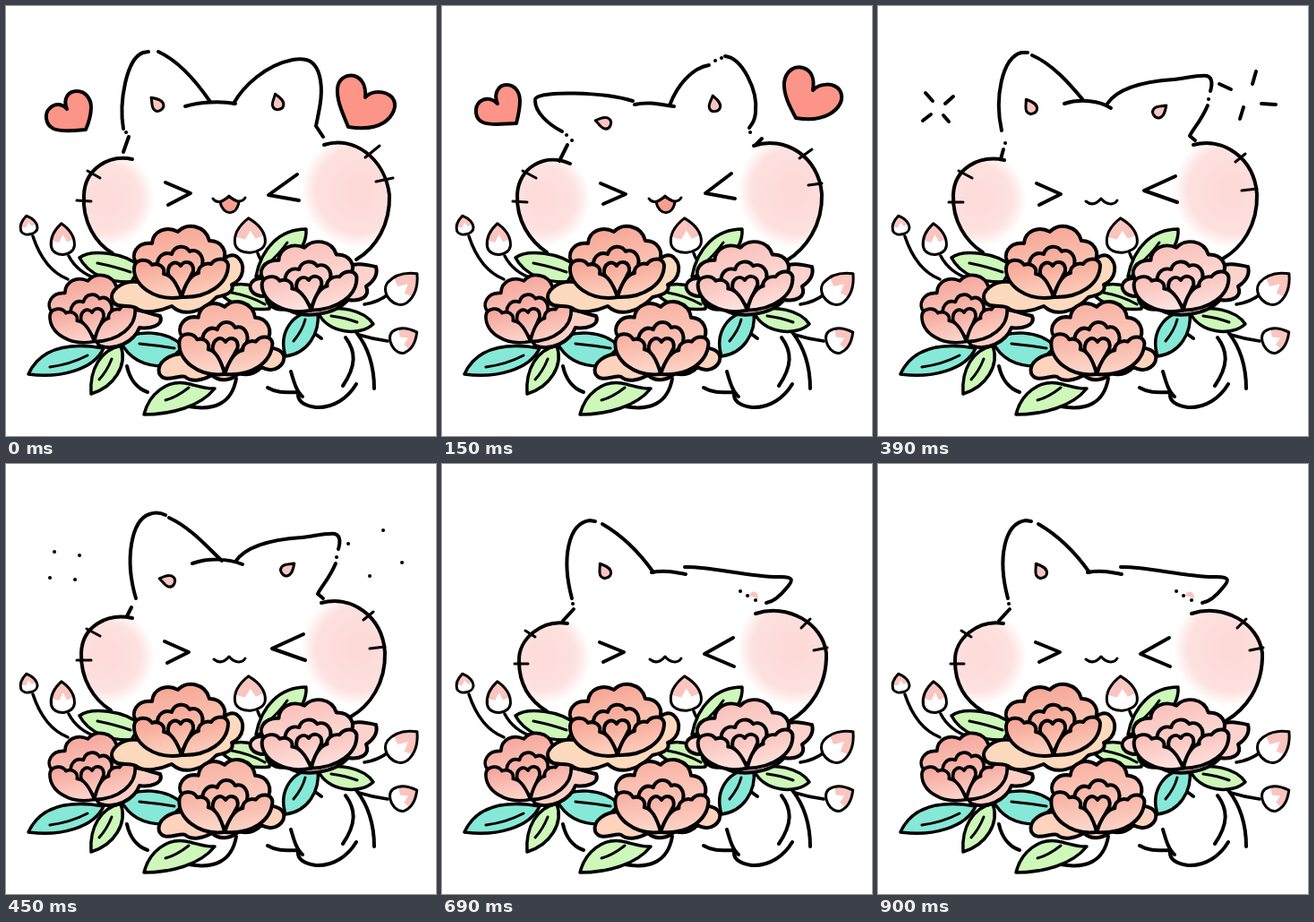
An HTML page for the animation above (1050 ms loop, 480 by 480 pixels).

```html
<!DOCTYPE html>
<html lang="en">
<head>
<meta charset="utf-8">
<title>Cat with peonies</title>
<style>
  html, body { margin: 0; width: 100%; height: 100%; overflow: hidden; background: #fff; }
  svg { display: block; width: 100%; height: 100%; }
  path { stroke-linecap: round; stroke-linejoin: round; }
</style>
</head>
<body>
<svg id="stage" viewBox="0 0 480 480">
  <defs>
    <radialGradient id="blushLeft" gradientUnits="userSpaceOnUse" cx="112" cy="215" r="54">
      <stop offset=".2" stop-color="#fddcda"/><stop offset=".7" stop-color="#fde2e0"/><stop offset="1" stop-color="#fff"/>
    </radialGradient>
    <radialGradient id="blushRight" gradientUnits="userSpaceOnUse" cx="394" cy="206" r="64">
      <stop offset=".2" stop-color="#fddad8"/><stop offset=".75" stop-color="#fde1df"/><stop offset="1" stop-color="#fff"/>
    </radialGradient>
  </defs>
  <g id="cat" fill="none" stroke="#000" stroke-width="4"></g>
  <g id="bouquet" fill="none" stroke="#000" stroke-width="4"></g>
</svg>
<script>
const STEP = 150;
const BLACK = '#000';

const path = (d, fill = 'none', stroke = BLACK, extra = '') =>
  `<path d="${d}" fill="${fill}" stroke="${stroke}" ${extra}/>`;
const thin = (d, fill) => path(d, fill, BLACK, 'stroke-width="3"');
const place = (x, y, turn, content, scale = 1) =>
  `<g transform="translate(${x} ${y}) rotate(${turn}) scale(${scale})">${content}</g>`;
const dots = points => points.map(([x, y]) => `M${x} ${y}h.1`).join('');

// ---------- bouquet ----------
const MINT = '#86e8d6', GREEN = '#cdf8ba';

const leaves = [
  [GREEN, 'M82 281C95 271 132 275 150 291L140 308C116 309 92 300 82 281Z', 'M102 287Q122 291 139 297'],
  [MINT, 'M25 411C36 387 62 374 109 382C98 406 60 416 25 411Z', 'M49 403Q72 400 91 390'],
  [GREEN, 'M95 433C93 405 106 384 128 379C136 401 121 425 95 433Z', 'M104 417Q113 407 118 394'],
  [MINT, 'M128 375C145 360 180 362 198 380L176 402C155 402 138 395 128 375Z', 'M149 377Q170 379 188 382'],
  [GREEN, 'M154 456C160 432 180 418 200 421C212 423 222 428 233 427C217 447 185 456 154 456Z', 'M178 440Q190 437 204 426'],
  [GREEN, 'M335 249C306 249 285 270 279 302C301 300 337 277 335 249Z', 'M288 292Q305 277 314 264'],
  [GREEN, 'M238 320C254 306 274 308 296 323L294 338C268 341 251 333 238 320Z', 'M252 320Q271 323 289 333'],
  [MINT, 'M312 391C304 365 319 340 348 341C351 366 336 388 312 391Z', 'M321 374Q331 362 334 350'],
  [GREEN, 'M348 342C370 332 400 340 410 355C395 369 360 366 348 342Z', 'M363 346Q379 348 392 353'],
];

// x, y, turn, horizontal and vertical scale
const buds = [
  [25, 245, -12, .72, .85],
  [63, 261, -4, 1, 1.4],
  [272, 257, -4, 1.3, 1.55],
  [443, 314, 46, 1.2, 1.7],
  [444, 372, 62, 1.05, 1.28],
];
const budShape = 'M0 -13C7 -9 14 -3 13 5C11 14 -11 14 -13 5C-14 -3 -7 -9 0 -13Z';
const budTip = 'M0 -13C7 -9 12 -5 12 0L5 2L1 -4L-4 2L-12 0C-12 -5 -7 -9 0 -13Z';

const stems = 'M30 257C37 278 49 297 69 305M70 279Q80 298 103 305M281 276Q284 285 291 291'
  + 'M428 321Q415 331 400 333M426 374Q410 372 394 367';
const body = 'M135 402C138 416 146 427 158 431M257 416C252 444 232 452 204 447'
  + 'M292 426C304 433 314 431 325 431M318 408C322 422 325 431 331 436M326 432C325 441 332 446 346 448C366 449 382 437 391 422'
  + 'M379 370C391 386 391 402 376 424M391 364C405 382 411 404 411 427M341 363L352 371';

const crown = 'M-50 -3C-58 -12 -50 -27 -33 -25C-32 -39 -17 -45 -4 -38C6 -49 27 -45 31 -28C45 -28 53 -15 45 -3L30 22L-30 22Z';
const middle = 'M-26 4C-30 -8 -21 -17 -11 -13C-8 -23 4 -24 9 -16C18 -20 27 -10 22 2L0 30Z';
const heart = 'M-15 9C-16 -3 -6 -7 -1 0C3 -7 14 -5 13 6L0 32Z';
const leftPetal = 'M0 35C-30 40 -54 22 -53 2C-52 -8 -38 -9 -33 -1C-25 -4 -18 2 -20 9C-11 10 -5 20 0 35Z';
const rightPetal = 'M0 35C30 36 52 20 52 -1C50 -10 38 -9 33 -2C25 -4 18 2 19 8C10 10 4 20 0 35Z';

const flowers = [
  { x: 97, y: 342, sx: .91, sy: .93, turn: -3, deep: '#f4a097', pale: '#fcd1c7', outer: '#fbcfc4',
    back: 'M134 321C146 314 151 328 145 339C157 341 165 345 172 346C177 357 159 361 149 359C143 375 121 386 104 379L88 355Z' },
  { x: 339, y: 306, sx: 1.01, sy: .96, turn: -3, deep: '#f9bbb5', pale: '#fde0dc', outer: '#fcd3cc',
    back: 'M378 291C391 286 403 289 413 291C416 302 408 309 402 313C407 325 395 330 382 328C367 345 331 350 314 338C301 341 289 333 291 324C273 325 268 312 277 306C283 302 296 305 303 309Z' },
  { x: 196, y: 290, sx: 1, sy: 1, turn: 0, deep: '#f5a090', pale: '#fccebc', outer: '#fdd9bd',
    back: 'M147 308C130 306 114 318 119 329C122 338 138 333 145 337C154 345 174 340 185 335C199 348 220 341 235 325C249 322 255 318 252 311C266 305 268 288 258 280C252 276 244 280 240 286Z' },
  { x: 246, y: 375, sx: .99, sy: 1.03, turn: 3, deep: '#f7ac9d', pale: '#fcd5c8', outer: '#fdd3bd',
    back: 'M199 388C182 388 168 398 171 410C176 422 194 411 200 414C208 421 221 417 230 412C239 421 253 417 260 410C274 414 282 407 285 403C300 412 313 399 310 390C307 382 298 383 290 379Z' },
];

function flower(f, i) {
  const petals = [crown, middle, heart, leftPetal, rightPetal].map(d => path(d, `url(#petal${i})`)).join('');
  return `<linearGradient id="petal${i}" x2=".25" y2="1">
      <stop stop-color="${f.deep}"/><stop offset="1" stop-color="${f.pale}"/></linearGradient>`
    + path(f.back, f.outer) + place(f.x, f.y, f.turn, petals, `${f.sx} ${f.sy}`);
}

const bud = path(budShape, '#fff', 'none') + path(budTip, '#fbc5bf', 'none')
  + path(budShape, 'none', BLACK, 'vector-effect="non-scaling-stroke" stroke-width="3"');

document.getElementById('bouquet').innerHTML =
  path(stems, 'none', BLACK, 'stroke-width="3.5"') + path(body)
  + buds.map(([x, y, turn, sx, sy]) => place(x, y, turn, bud, `${sx} ${sy}`)).join('')
  + leaves.map(([fill, shape, vein]) => path(shape, fill, BLACK, 'stroke-width="3.5"') + thin(vein)).join('')
  + flowers.map(flower).join('');

// ---------- cat ----------
const drop = 'M-1 -9C3 -5 8 0 6 5C4 10 -5 10 -6 4C-7 0 -3 -4 -1 -9Z';
const openMouth = 'M231 215C235 221 242 219 249 212C256 219 263 220 267 214';
const tongue = 'M239 219C242 234 257 235 260 219L249 213Z';
const closedMouth = 'M232 218C237 222 243 222 249 215C255 222 263 223 267 217';
const rightEarTilted = 'M256 109C268 91 300 84 330 82C346 80 358 77 367 78C374 80 373 88 371 95M369 104h.1M368 111C361 128 351 138 348 145L354 150';

// marks: ear insides as x, y, turn
const blink = {
  head: 'M145 150C133 105 141 66 165 63L171 64M179 67C205 82 224 104 236 121M234 121C249 118 261 121 272 123'
    + 'M271 115C300 114 345 127 378 126C393 126 392 130 385 138C377 148 369 154 362 155M146 156h.1M147 162L135 175'
    + dots([[333, 142], [341, 147], [350, 152]]),
  left: 'M140 178C112 173 85 195 86 220C86 248 99 265 117 276',
  right: 'M350 167C386 155 425 178 429 211C430 249 410 274 388 287',
  ticks: 'M93 186L104 193M81 223L96 223M401 183L411 173M415 208L430 205',
  eyes: 'M176 199L203 210L180 221M325 194L293 212L326 226',
  marks: [[181, 119, -25]],
  tint: 'M343 147C345 140 353 141 353 150Z',
};

const poses = [
  {
    head: 'M131 137C126 108 134 59 153 52L159 51M170 51C192 61 213 85 228 107M200 112C216 107 240 106 256 109'
      + 'M254 109C265 89 290 66 320 60C338 57 346 63 350 78C355 98 349 118 346 134L354 146M137 146L131 163M134 141h.1',
    left: 'M141 171C115 165 88 182 87 211C85 241 100 265 119 276',
    right: 'M355 155C388 144 423 170 428 211C429 244 413 270 391 283',
    ticks: 'M91 184L105 192M79 217L95 218M401 169L417 156M413 196L432 192',
    eyes: 'M178 197L206 209L181 222M325 188L293 211L327 217',
    marks: [[168, 109, -35], [303, 107, -10]],
    open: true,
    hearts: [
      'M89 138C78 139 62 141 53 137C43 132 43 119 49 114C55 108 63 109 68 115C63 103 70 95 79 95C89 95 95 104 95 113C95 122 92 131 89 138Z',
      'M382 135C376 120 369 106 370 92C371 81 380 76 389 78C398 81 402 90 401 102C408 94 423 94 431 102C438 111 432 123 422 130C411 137 395 137 382 135Z',
    ],
  },
  {
    head: 'M104 106C104 118 118 132 134 140M104 104C107 94 181 96 213 106M215 110C233 106 247 111 259 112'
      + 'M254 111C263 87 280 69 298 66M316 56C335 58 353 94 350 119C349 130 346 131 343 136M357 148L350 155M140 155L131 173'
      + dots([[139, 144], [145, 150], [305, 61], [312, 58], [344, 141]]),
    left: 'M143 176C114 163 85 181 84 211C83 240 98 262 117 275',
    right: 'M348 156C382 144 421 168 424 210C425 245 406 271 385 284',
    ticks: 'M90 184L105 192M79 218L95 219M399 170L413 160M409 200L424 198',
    eyes: 'M177 198L205 210L180 221M323 187L294 209L327 215',
    marks: [[180, 130, -70], [304, 109, -5]],
    open: true,
    hearts: [
      'M83 131C71 131 55 134 46 130C36 126 36 113 42 107C49 101 57 104 62 109C57 98 63 88 72 88C83 88 87 98 87 106C87 115 85 123 83 131Z',
      'M395 125C388 112 381 99 382 85C384 72 394 66 403 69C413 72 416 82 414 94C422 86 437 85 444 94C450 104 443 115 432 121C421 127 407 127 395 125Z',
    ],
  },
  {
    head: 'M138 139C130 103 138 58 160 52L167 52M172 55C195 65 214 87 229 105M208 109C226 103 248 106 260 114'
      + 'M142 153h.1M140 160L137 171' + rightEarTilted,
    left: 'M141 172C113 166 85 181 84 211C83 240 98 263 117 275',
    right: 'M352 155C386 146 420 170 423 210C424 245 406 270 385 282',
    ticks: 'M90 184L105 192M79 219L95 219M399 174L410 165M406 206L423 204',
    eyes: 'M177 198L204 210L180 222M332 190L297 206L334 219',
    marks: [[170, 112, -25], [315, 117, 55]],
    spark: 'M53 97L61 106M84 101L75 109M50 128L59 121M73 122L79 129'
      + 'M422 73L418 87M381 87L394 93M428 109L444 110M408 113L404 126',
  },
  {
    head: 'M145 150C132 106 140 63 160 56C168 53 174 55 178 57M182 60C206 71 225 93 241 108M208 111C226 105 247 105 264 112'
      + 'M140 160L135 170' + rightEarTilted,
    left: 'M141 172C113 166 85 181 84 211C83 240 98 263 117 275',
    right: 'M352 155C386 146 420 170 423 210C424 245 406 270 385 282',
    ticks: 'M90 184L105 192M79 219L95 219M399 174L410 165M406 206L423 204',
    eyes: 'M177 198L204 210L180 222M332 190L297 206L334 219',
    marks: [[180, 130, -70], [315, 117, 55]],
    spark: dots([[54, 98], [82, 102], [49, 127], [77, 129], [421, 74], [382, 89], [442, 110], [406, 125]]),
  },
  blink, blink, blink,
];

function drawCat(pose) {
  const mouth = pose.open ? thin(tongue, '#f79f90') + thin(openMouth) : thin(closedMouth);
  return path(pose.left + 'C145 278 170 250 166 210C164 190 154 178 140 171Z', 'url(#blushLeft)', 'none')
    + path(pose.right + 'C350 285 326 240 330 208C332 182 340 166 352 156Z', 'url(#blushRight)', 'none')
    + path(pose.head + pose.left + pose.right)
    + path(pose.eyes) + thin(pose.ticks)
    + pose.marks.map(([x, y, turn]) => place(x, y, turn, thin(drop, '#fbc4bf'))).join('')
    + path(pose.tint || '', '#fbc4bf', 'none')
    + (pose.hearts || []).map(d => path(d, '#fd9488')).join('')
    + path(pose.spark || '')
    + mouth;
}

const cat = document.getElementById('cat');
let shown;

function frame(now) {
  const pose = poses[Math.floor(now / STEP) % poses.length];
  if (pose !== shown) {
    cat.innerHTML = drawCat(pose);
    shown = pose;
  }
  requestAnimationFrame(frame);
}
frame(performance.now());
</script>
</body>
</html>
```
